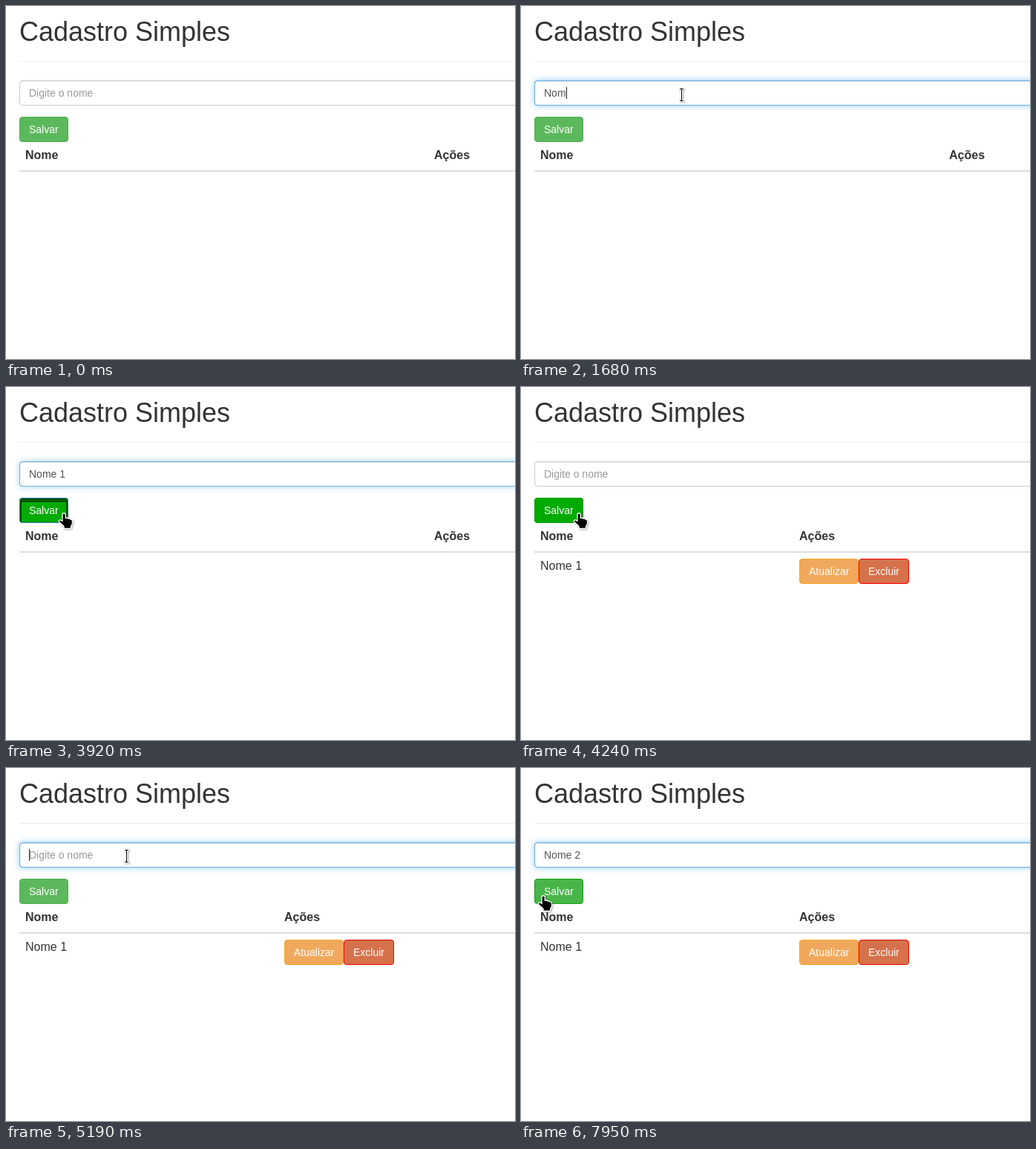
An HTML page that plays this animation: 686 by 475 pixels, repeating every 7.99 s.

```html
<!DOCTYPE html>
<html lang="pt-BR">
<head>
<meta charset="utf-8">
<title>Cadastro Simples</title>
<style>
  html, body { margin: 0; width: 100%; height: 100%; overflow: hidden; background: #fff; }
  body { position: relative; color: #333; font: 14px/20px "Liberation Sans", Arial, sans-serif; }
  div, h1, svg { position: absolute; box-sizing: border-box; white-space: pre; }
  h1 { margin: 0; left: 18px; top: 15px; font-size: 36px; font-weight: 500; line-height: 39.6px; font-weight: normal; }
  .line { left: 18px; right: 0; }
  .cell { font-size: 16px; line-height: 22.86px; }
  .head { top: 190px; font-weight: bold; }
  #field, #glow { left: 18px; top: 100px; width: 800px; height: 34px; border: 1px solid #ccc; border-radius: 4px; }
  #field { padding: 6px 12px; color: #555; box-shadow: inset 0 1px 1px rgba(0,0,0,.075); }
  #glow { border-color: #66afe9; box-shadow: inset 0 1px 1px rgba(0,0,0,.075), 0 0 8px rgba(82,180,240,.65); }
  #hint { color: #999; }
  #caret { position: absolute; top: 8px; width: 1px; height: 16px; background: #222; }
  .btn { height: 34px; padding: 6px 12px; border: 1px solid; border-radius: 4px; color: #fff; }
  #save { left: 18px; top: 149px; background: #5cb85c; }
  #hover { inset: -1px; border-radius: 4px; background: #00ab00; border: 1px solid #009c00; }
  #save.down #hover { border-color: #2f74a0; box-shadow: inset 0 3px 0 2px #005200; }
  #save span { position: relative; }
  #edit { left: 375px; top: 231px; background: #f0a95c; border-color: #f5a623; }
  #del { left: 455px; top: 231px; background: #d5714b; border-color: #f00; }
  svg { left: 0; top: 0; width: 100%; height: 100%; overflow: hidden; }
  #mouse { filter: drop-shadow(1px 1px 1px rgba(0,0,0,.35)); }
</style>
</head>
<body>
<h1>Cadastro Simples</h1>
<div class="line" style="top:74px;height:1px;background:#eee"></div>
<div id="field"><span id="typed"></span><i id="caret"></i><span id="hint">Digite o nome</span></div>
<div id="glow"></div>
<div id="save" class="btn"><div id="hover"></div><span>Salvar</span></div>
<div class="cell head" style="left:26px">Nome</div>
<div class="cell head" id="actions">Ações</div>
<div class="line" style="top:221px;height:2px;background:#ddd"></div>
<div id="row" style="left:0;top:0">
  <div class="cell" style="left:26px;top:230px">Nome 1</div>
  <div class="btn" id="edit">Atualizar</div>
  <div class="btn" id="del">Excluir</div>
</div>
<svg>
  <circle id="ring" fill="none" stroke="#6fb9ea" stroke-width="2"/>
  <g id="mouse" stroke-linejoin="round">
    <g id="beam" fill="none">
      <path d="M-3 -7.5H4M-3 8.5H4M.5 -8V9" stroke="#fff" stroke-width="3"/>
      <path d="M-2 -7.5H3M-2 8.5H3M.5 -8V9" stroke="#000"/>
    </g>
    <path id="hand" stroke="#fff" stroke-width="1.3"
      d="M-2 1Q0 -1.5 2.3 1V6.5Q4.5 5.3 6 7.2Q8 6.3 9 8.2Q11.3 7.8 11.5 10.5V14L9.5 17.5V20.5H0V17.5L-6.5 11.5Q-7.5 8.5 -4.5 9L-2 10.5Z"/>
    <path id="arrow" stroke="#fff" stroke-width="1.2" d="M0 0V16L3.8 12.5L6.5 18.5L9 17.3L6.4 11.5H11.5Z"/>
  </g>
</svg>
<script>
const LOOP = 7990, ROW_AT = 4100;
const $ = id => document.getElementById(id);
const clamp = v => Math.max(0, Math.min(1, v));

const typing = [[0, ''], [1280, 'N'], [1490, 'No'], [1680, 'Nom'], [1820, 'Nome'], [2560, 'Nome '],
  [2830, 'Nome 1'], [ROW_AT, ''], [5890, 'N'], [6090, 'No'], [6200, 'Nom'], [6300, 'Nome'],
  [6740, 'Nome '], [7010, 'Nome 2']];
const carets = [[460, 960], [1280, 2420], [2560, 3320], [4860, 5410], [5890, 7510]];
const focus = [[460, 3900], [4860, 9e3]];
const hovers = [[3610, 4670], [7590, 7670], [7920, 9e3]];
const presses = [460, 3900, 4860];
// time, x, y
const path = [[200, 700, 128], [440, 216, 119], [3300, 216, 119], [3700, 78, 170], [4540, 78, 170],
  [4800, 162, 118], [7490, 162, 118], [7710, -16, 182], [7850, -8, 186], [7935, 30, 172]];

const within = (t, spans) => spans.some(([a, b]) => t >= a && t < b);
const fade = (t, spans, ms) => Math.max(...spans.map(([a, b]) =>
  Math.min(clamp((t - a) / ms), 1 - clamp((t - b) / ms))));
const show = (id, on) => { $(id).style.display = on ? '' : 'none'; };

function mouseAt(t) {
  const i = path.findIndex(p => p[0] > t);
  if (i < 0) return path[path.length - 1].slice(1);
  if (i === 0) return path[0].slice(1);
  const [a, b] = [path[i - 1], path[i]];
  const u = (t - a[0]) / (b[0] - a[0]), e = u * u * (3 - 2 * u);
  return [1, 2].map(k => a[k] + (b[k] - a[k]) * e);
}

function draw(t) {
  const text = typing.filter(k => k[0] <= t).pop()[1];
  $('typed').textContent = text;
  show('hint', !text);
  show('caret', within(t, carets));
  $('glow').style.opacity = fade(t, focus, 150);

  const hover = fade(t, hovers, 150);
  $('hover').style.opacity = hover;
  $('save').style.borderColor = hover > 0 ? '#12a012' : '#4cae4c';
  $('save').className = t >= 3900 && t < 4040 ? 'btn down' : 'btn';

  show('row', t >= ROW_AT);
  $('actions').style.left = t >= ROW_AT ? '375px' : '577px';

  const [x, y] = mouseAt(t).map(Math.round);
  $('mouse').setAttribute('transform', `translate(${x} ${y})`);
  const beam = x >= 18 && y >= 100 && y < 134;
  const hand = x >= 18 && x < 84 && y >= 149 && y < 183;
  show('beam', beam);
  show('hand', hand);
  show('arrow', !beam && !hand);

  const age = t - (presses.filter(p => p <= t).pop() ?? -1e4);
  show('ring', age > 50 && age < 300);
  $('ring').setAttribute('cx', x + .5);
  $('ring').setAttribute('cy', y + .5);
  $('ring').setAttribute('r', 3 + .045 * clamp(age / 300) * 300);
  $('ring').setAttribute('opacity', clamp((300 - age) / 160));
}

let start;
function tick(now) {
  start ??= now;
  draw((now - start) % LOOP);
  requestAnimationFrame(tick);
}
draw(0);
requestAnimationFrame(tick);
</script>
</body>
</html>
```
